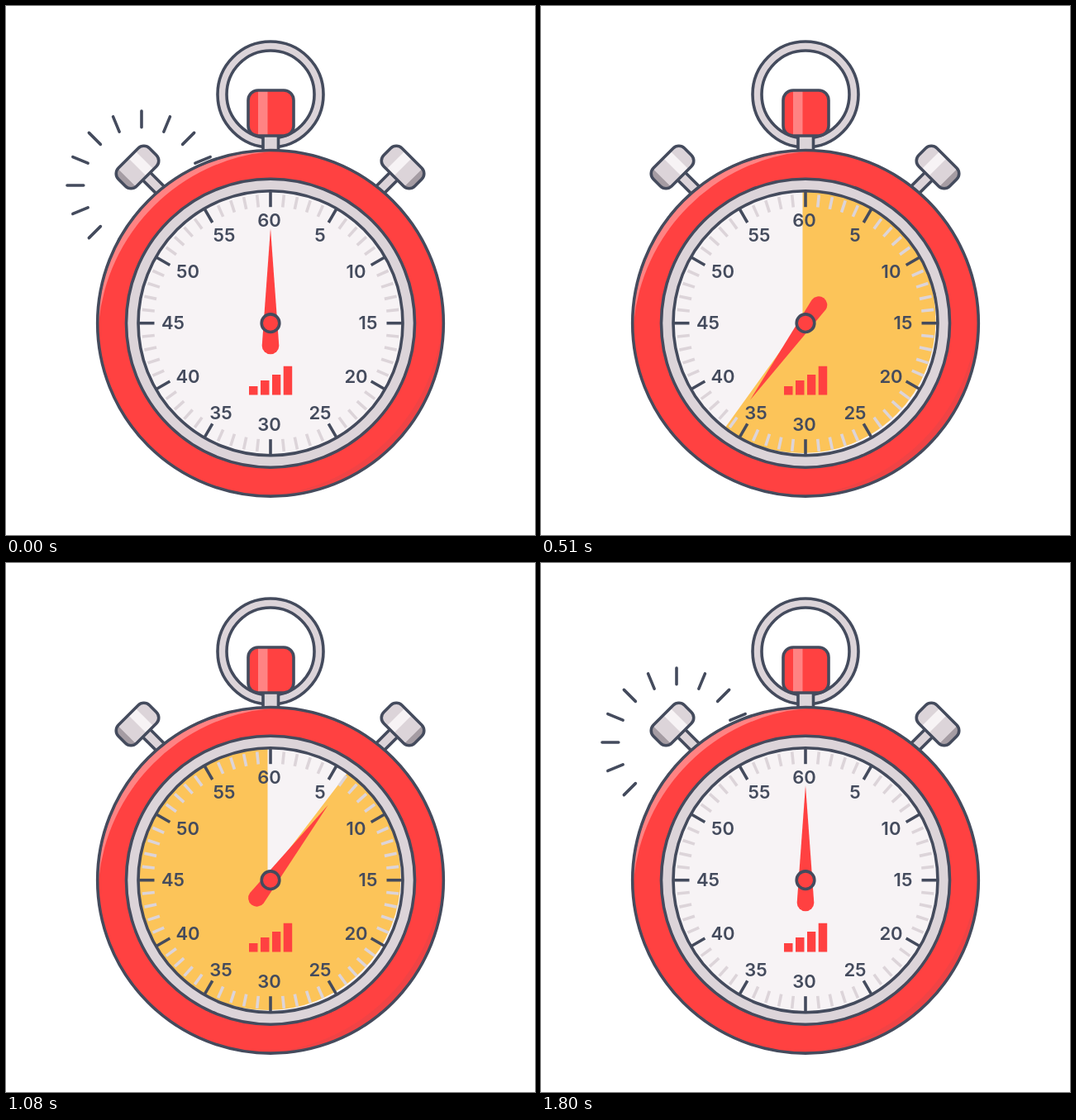
Write an HTML page that moves like this. It is 640 px wide and 640 px high and loops after 1830 ms.

```html
<!DOCTYPE html>
<html lang="en">
<head>
<meta charset="utf-8">
<title>Stopwatch</title>
<style>
  html, body { margin: 0; width: 100%; height: 100%; overflow: hidden; background: #fff; }
  svg { display: block; width: 100vw; height: 100vh; }
  .line { stroke: #444b5d; stroke-width: 3.6; }
  .red { fill: #ff4141; }
  .grey { fill: #dcd4d9; }
  .face { fill: #f7f3f5; }
  .gloss { fill: #ff8383; }
  .shade { fill: #f04345; }
  .minor { stroke: #dcd4d9; stroke-width: 3.6; }
  .spark { stroke-linecap: round; }
  text { font: 600 22px Inter, "Liberation Sans", sans-serif; fill: #444b5d; text-anchor: middle; }
</style>
</head>
<body>
<svg viewBox="0 0 640 640">
  <defs>
    <clipPath id="capClip"><rect x="-26.5" y="-15.5" width="53" height="31" rx="9.5"/></clipPath>
    <g id="button" transform="translate(159 195) rotate(-45)">
      <rect class="grey line" x="-6.5" y="10" width="13" height="36"/>
      <g clip-path="url(#capClip)">
        <rect class="grey" x="-27" y="-16" width="54" height="32"/>
        <rect class="face" x="0" y="-16" width="12" height="32"/>
        <rect fill="#a59ca3" x="-27" y="-16" width="9" height="32"/>
      </g>
      <rect class="line" fill="none" x="-26.5" y="-15.5" width="53" height="31" rx="9.5"/>
    </g>
  </defs>

  <g id="sparks"></g>
  <use href="#button"/>
  <use href="#button" transform="translate(639 0) scale(-1 1)"/>

  <!-- ring and crown -->
  <circle class="grey line" cx="320" cy="107" r="64"/>
  <circle class="line" fill="#fff" cx="320" cy="107" r="53"/>
  <rect class="grey line" x="311" y="154" width="18.5" height="24"/>
  <rect class="red" x="293" y="102" width="55" height="55" rx="12"/>
  <rect class="gloss" x="305" y="103" width="11.5" height="53"/>
  <rect class="line" fill="none" x="293" y="102" width="55" height="55" rx="12"/>

  <!-- case -->
  <circle class="red" cx="320" cy="383.8" r="209.3"/>
  <path class="gloss" d="M112 384A208 208 0 0 1 320 176A230 230 0 0 0 112 384Z"/>
  <path class="shade" d="M528 384A208 208 0 0 1 320 592A230 230 0 0 0 528 384Z"/>
  <circle class="line" fill="none" cx="320" cy="383.8" r="209.3"/>

  <!-- dial -->
  <circle class="face" cx="320" cy="383.7" r="160"/>
  <circle id="sector" cx="316.5" cy="380" r="80.5" fill="none" stroke="#fcc459"
    stroke-width="161" pathLength="360" transform="rotate(-90 316.5 380)"/>
  <circle fill="none" stroke="#dcd4d9" stroke-width="14.5" cx="320" cy="383.7" r="167.2"/>
  <circle class="line" fill="none" cx="320" cy="383.7" r="174.5"/>
  <circle class="line" fill="none" cx="320" cy="383.7" r="160"/>
  <g id="ticks"></g>
  <g id="labels"></g>
  <path class="red" d="M294 460h10.5v10.5h-10.5zM308 453h10.5v17.5h-10.5zM322 446h10.3v24.5h-10.3zM335.7 435.7h10.5v34.8h-10.5z"/>
  <path id="needle" class="red" d="M320 269L330.3 411A10.3 10.3 0 0 1 309.7 411Z"/>
  <circle class="red line" cx="320" cy="383.7" r="10.8"/>
</svg>
<script>
const $ = id => document.getElementById(id);
const LOOP = 1830, STEP = 30, TURN = 900;

function add(parent, tag, attrs, text) {
  const el = document.createElementNS('http://www.w3.org/2000/svg', tag);
  for (const k in attrs) el.setAttribute(k, attrs[k]);
  if (text) el.textContent = text;
  return parent.appendChild(el);
}

for (let i = 0; i < 60; i++) {
  const major = i % 5 === 0;
  add($('ticks'), 'line', {
    class: major ? 'line' : 'minor',
    x1: 320, x2: 320,
    y1: 383.7 - (major ? 159 : 156), y2: 383.7 - (major ? 140.5 : 141),
    transform: `rotate(${i * 6} 320 383.7)`
  });
}

const labels = [
  [60, 318.5, 259], [5, 380, 277], [10, 423.5, 321], [15, 438, 383],
  [20, 423.5, 448], [25, 380, 492], [30, 318.5, 506], [35, 260, 492],
  [40, 220, 448], [45, 202, 383], [50, 220, 321], [55, 264, 277]
];
for (const [n, x, y] of labels) add($('labels'), 'text', { x, y: y + 8 }, String(n));

// A ring of rays around a button; the dial hides the ones behind it.
function makeBurst(x, y) {
  const g = add($('sparks'), 'g', { transform: `translate(${x} ${y})` });
  const rays = [];
  for (let i = 0; i < 16; i++)
    rays.push(add(g, 'line', { class: 'line spark', transform: `rotate(${i * 22.5})` }));
  return { g, rays };
}
const leftBurst = makeBurst(164, 217);
const rightBurst = makeBurst(456, 214);

function ease(x) {
  x = Math.min(1, Math.max(0, x));
  return x * x * (3 - 2 * x);
}

// u is the time from the moment the hand passes the top.
function drawBurst({ g, rays }, u) {
  const outer = 66 + 24 * ease((u + 175) / 150);
  const inner = 66 + 24 * ease((u + 40) / 150);
  g.style.display = outer - inner > 0.3 ? '' : 'none';
  for (const ray of rays) {
    ray.setAttribute('x1', inner);
    ray.setAttribute('x2', outer);
  }
}

function draw(t) {
  const emptying = t >= TURN;
  const angle = 360 * ease((emptying ? t - TURN : t) / TURN);
  $('needle').setAttribute('transform', `rotate(${angle} 320 383.7)`);
  const start = emptying ? angle : 0;
  const length = emptying ? 360 - angle : angle;
  $('sector').setAttribute('stroke-dasharray', `0 ${start} ${length} 720`);
  $('sector').style.display = length > 0.01 ? '' : 'none';
  drawBurst(leftBurst, t > TURN ? t - 2 * TURN : t);
  drawBurst(rightBurst, t - TURN);
}

const begin = performance.now();
function tick() {
  const t = (performance.now() - begin) % LOOP;
  draw(Math.floor(t / STEP) * STEP);
  requestAnimationFrame(tick);
}
tick();
</script>
</body>
</html>
```
